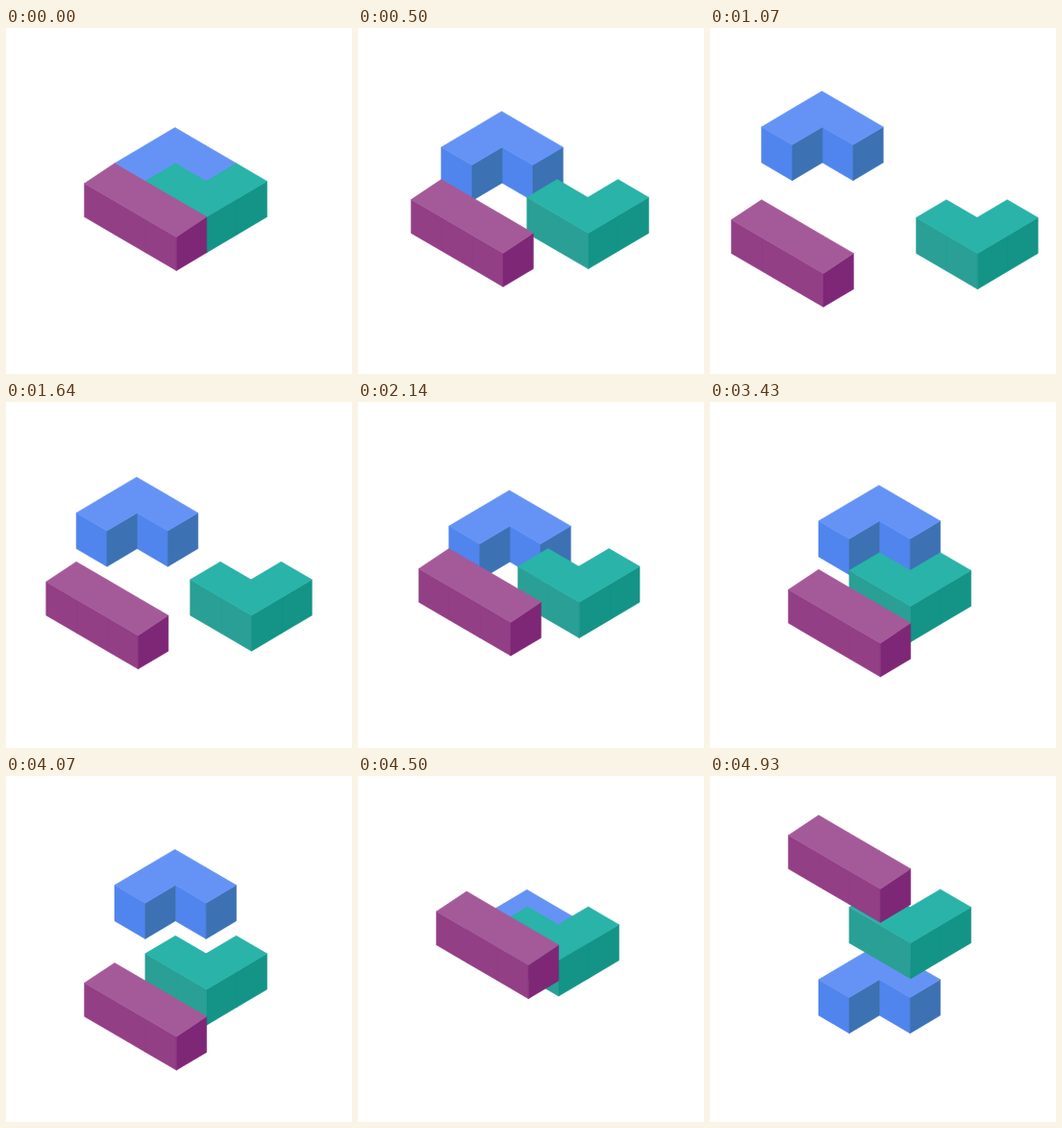
Recreate the animation shown at these times as an HTML page with a canvas. Size 360x360 px, loop 5 s.

```html
<!DOCTYPE html>
<html lang="en">
<head>
<meta charset="utf-8">
<title>Block puzzle</title>
<style>
  html, body { margin: 0; width: 100%; height: 100%; overflow: hidden; background: #fff; }
  canvas { display: block; width: 360px; height: 360px; }
</style>
</head>
<body>
<canvas id="stage" width="360" height="360"></canvas>
<script>
const ctx = document.getElementById('stage').getContext('2d');
const LOOP = 5000, STEPS = 70;
const ORIGIN = { x: 175.8, y: 103.6 };
const UNIT = { i: 31.9, j: 31.4, y: 18.6, z: 37.2 };
const SLOPE = 0.587;
const DIP = 2.3; // the top of the front row slopes down a little

// Cells are [i, j]: i runs down to the right, j down to the left.
// slide is the screen direction of the sideways move; lift holds the
// vertical travel before and after the blocks pass through each other.
const pieces = [
  { cells: [[0, 0], [1, 0], [0, 1]], slide: [-1, -1], lift: [-38.5, -54],
    top: '#6593f5', left: '#5085ee', right: '#3c71b3' },
  { cells: [[2, 0], [1, 1], [2, 1]], slide: [1, 1], lift: [36, 17.4],
    top: '#2ab3a8', left: '#2a9f95', right: '#139486' },
  { cells: [[0, 2], [1, 2], [2, 2]], slide: [-1, 1], lift: [76, 76],
    top: '#a45a98', left: '#923f86', right: '#7e2776' }
];

const clamp = x => Math.max(0, Math.min(1, x));
const mix = (a, b, x) => a + (b - a) * x;

// Between a straight line (soft = 0) and a smooth step (soft = 1).
function ramp(step, from, to, soft) {
  const x = clamp((step - from) / (to - from));
  return mix(x, x * x * (3 - 2 * x), soft);
}

function spread(step) {
  return 66.2 * (step < 15.7 ? ramp(step, 0, 15.7, 0.5) : 1 - ramp(step, 15.7, 36.4, 0.1));
}

function rise(step) {
  if (step < 55.2) return ramp(step, 42.2, 55.2, 0.2);
  return step < 66
    ? mix(1, -0.763, ramp(step, 55.2, 66, 0))
    : mix(-0.763, -1.316, ramp(step, 66, 69, 0));
}

// All faces of one colour go into a single path, so no seams show.
function fillFaces(faces, color) {
  ctx.beginPath();
  for (const points of faces) {
    points.forEach(([x, y], n) => n ? ctx.lineTo(x, y) : ctx.moveTo(x, y));
    ctx.closePath();
  }
  ctx.fillStyle = ctx.strokeStyle = color;
  ctx.lineWidth = 0.6;
  ctx.fill();
  ctx.stroke();
}

function drawPiece(piece, dx, dy) {
  const has = (i, j) => piece.cells.some(c => c[0] === i && c[1] === j);
  const at = (i, j, drop = 0) => [
    ORIGIN.x + i * UNIT.i - j * UNIT.j + dx,
    ORIGIN.y + (i + j) * UNIT.y + drop * UNIT.z + Math.max(0, j - 2) * DIP * (1 - drop) + dy
  ];
  const wall = (p, q) => [at(...p), at(...q), at(...q, 1), at(...p, 1)];
  const tops = [], lefts = [], rights = [];
  for (const [i, j] of piece.cells) {
    const front = [i + 1, j + 1];
    if (!has(i, j + 1)) lefts.push(wall([i, j + 1], front));
    if (!has(i + 1, j)) rights.push(wall(front, [i + 1, j]));
    tops.push([at(i, j), at(i + 1, j), at(...front), at(i, j + 1)]);
  }
  fillFaces(lefts, piece.left);
  fillFaces(rights, piece.right);
  fillFaces(tops, piece.top);
}

function draw(now) {
  const step = Math.floor((now % LOOP) * STEPS / LOOP + 0.07) % STEPS;
  const d = spread(step), r = rise(step);
  ctx.fillStyle = '#fff';
  ctx.fillRect(0, 0, 360, 360);
  for (const piece of pieces) {
    const [sx, sy] = piece.slide;
    const lift = r * piece.lift[r < 0 ? 1 : 0];
    drawPiece(piece, d * (sx + 0.08), d * sy * SLOPE + lift);
  }
}

let start;
function tick(now) {
  start ??= now;
  draw(now - start);
  requestAnimationFrame(tick);
}
draw(0);
requestAnimationFrame(tick);
</script>
</body>
</html>
```
